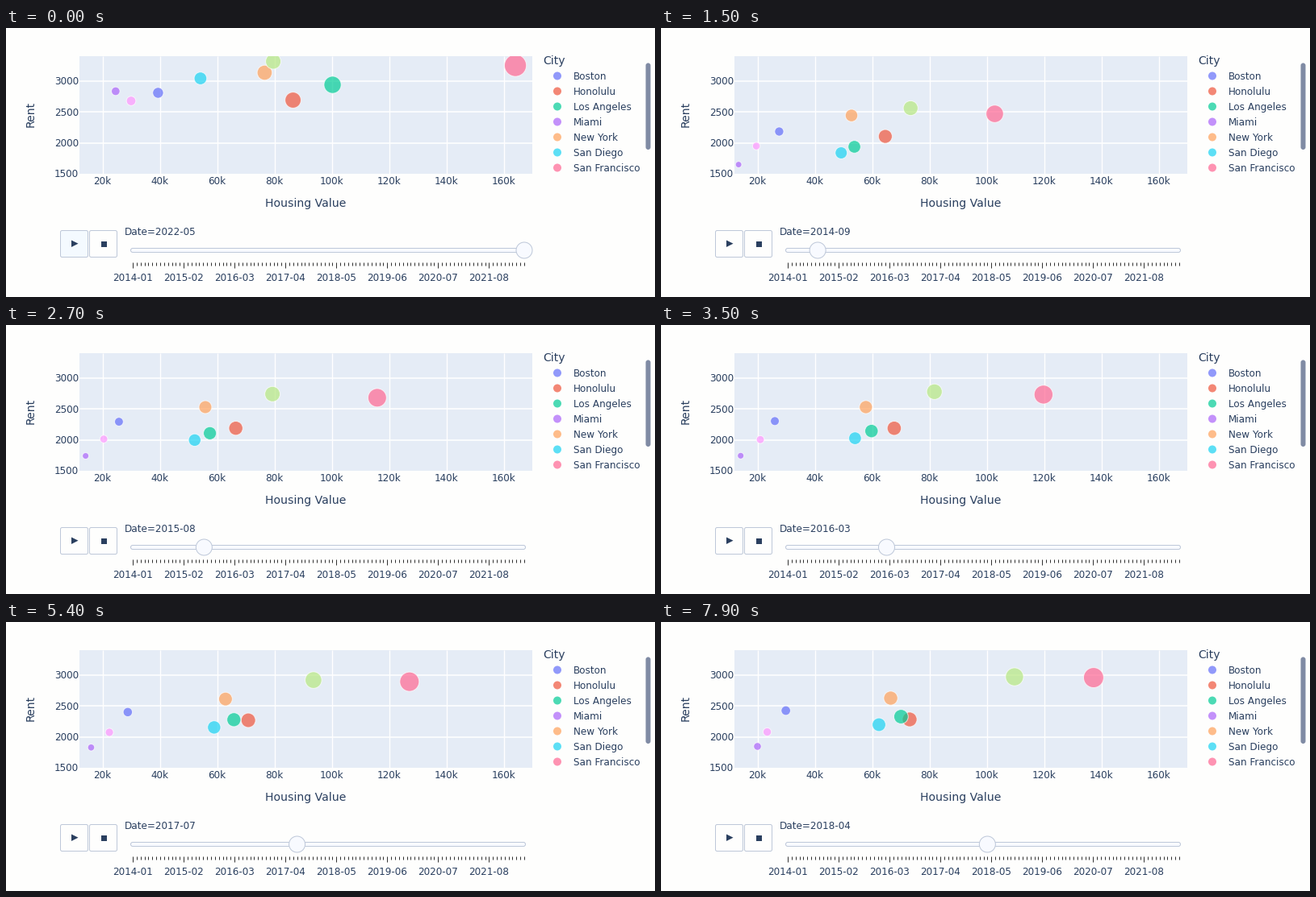
Animation, 804 px wide and 334 px high, one loop 8 s. Source, as a matplotlib script:

```python
import numpy as np
import matplotlib.pyplot as plt
from matplotlib.animation import FuncAnimation
from matplotlib.patches import Circle, FancyBboxPatch, Polygon, Rectangle

W, H, DPI = 804, 334, 64
PT = 72 / DPI
FRAMES, STEP = 80, 100
INK, EDGE, PAGE = "#2a3f5f", "#bec8d9", "#fefefd"
FIRST, RECENT, LAST = 7.6, 51, 100  # months since 2014-01

# label, colour, housing value (k) and rent at FIRST, RECENT and LAST
CITIES = [
    ("Boston", "#636efa", (27.6, 29.9, 39.4), (2172, 2426, 2811)),
    ("Honolulu", "#ef553b", (64.6, 73.1, 86.5), (2093, 2283, 2693)),
    ("Los Angeles", "#00cc96", (53.8, 70.1, 100.3), (1924, 2328, 2941)),
    ("Miami", "#ab63fa", (13.4, 20.0, 24.6), (1637, 1846, 2837)),
    ("New York", "#ffa15a", (52.8, 66.5, 76.6), (2432, 2628, 3137)),
    ("San Diego", "#19d3f3", (49.2, 62.4, 54.2), (1826, 2198, 3045)),
    ("San Francisco", "#ff6692", (102.7, 137.3, 164.1), (2458, 2960, 3254)),
    ("", "#b6e880", (73.4, 109.7, 79.6), (2550, 2973, 3319)),
    ("", "#ff97ff", (19.6, 23.4, 30.0), (1937, 2080, 2680)),
]
# Early surge and late delay of housing value, by city index
BENDS = {0: (-7.5, 0), 3: (0, 3), 6: (1.3, 1), 7: (0, 1.8)}

plt.rcParams["font.family"] = "DejaVu Sans"
fig = plt.figure(figsize=(W / DPI, H / DPI), dpi=DPI, facecolor=PAGE)
ax = fig.add_axes([0, 0, 1, 1])
ax.set_xlim(0, W)
ax.set_ylim(H, 0)
ax.axis("off")


def text(x, y, s, size=12, ha="left"):
    return ax.text(x, y, s, fontsize=size * PT, color=INK, ha=ha, va="baseline")


def rounded(x, y, w, h, r, fill, edge="none"):
    return ax.add_patch(FancyBboxPatch(
        (x, y), w, h, boxstyle=f"round,pad=0,rounding_size={r}",
        fc=fill, ec=edge, lw=PT))


def line(x0, y0, x1, y1, color, lw):
    ax.plot([x0, x1], [y0, y1], color=color, lw=lw * PT, solid_capstyle="butt")


def value_x(v):
    return 119.5 + 3.55 * (v - 20)


def rent_y(r):
    return 181 - (r - 1500) * 0.07667


def month_x(m):
    return 157 + 4.85 * m


def month_name(m):
    return f"{2014 + m // 12}-{m % 12 + 1:02d}"


# Plot area
area = ax.add_patch(Rectangle((91, 35), 561, 146, fc="#e5ecf6", ec="none"))
for v in range(20, 161, 20):
    line(value_x(v), 35, value_x(v), 181, "white", 1.4)
    text(value_x(v), 194, f"{v}k", ha="center")
for r in range(1500, 3001, 500):
    if r > 1500:
        line(91, rent_y(r), 652, rent_y(r), "white", 1.6)
    text(90, rent_y(r) + 4.3, str(r), ha="right")
text(371.5, 222, "Housing Value", 14, "center")
ax.text(38, 106.5, "Rent", fontsize=14 * PT, color=INK, rotation=90,
        ha="right", va="center")

# Legend
text(665.5, 45, "City", 14)
for i, (name, color, *_) in enumerate(CITIES):
    if name:
        y = 59.5 + 19 * i
        ax.add_patch(Circle((683, y), 5, fc=color, ec="none", alpha=0.7))
        text(703, y + 4.5, name)
rounded(792.5, 43.5, 6, 107.5, 3, "#808ba4")

# Buttons
play = rounded(67.5, 251.5, 34, 33, 2, PAGE, EDGE)
rounded(103.5, 251.5, 34, 33, 2, PAGE, EDGE)
ax.add_patch(Polygon([(81, 263.5), (89.5, 267.7), (81, 272)], fc=INK, ec="none"))
ax.add_patch(Rectangle((117.5, 264.5), 7, 7, fc=INK, ec="none"))

# Slider
rounded(154.5, 273.5, 489, 5, 2.5, "#f8faff", EDGE)
for m in range(LAST + 1):
    major = m % 13 == 0
    line(month_x(m), 291, month_x(m), 298 if major else 295, "#333333", 1)
    if major:
        text(month_x(m), 314, month_name(m), ha="center")
grip = ax.add_patch(Circle((0, 276), 10, fc="#f8faff", ec=EDGE, lw=PT, zorder=5))
label = text(147, 257, "")

bubbles = []
for _, color, *_ in CITIES:
    b = ax.add_patch(Circle((0, 0), 5, fc=color, ec="white", lw=PT, alpha=0.7, zorder=4))
    b.set_clip_path(area)
    bubbles.append(b)


def ease(p):
    p = np.clip(p, 0, 1)
    return p * p * (3 - 2 * p)


def playhead(t):
    """Month now reached (fractional) and month named in the label."""
    if t < 0.63:
        return 0, 0
    slow = max(t - 5.4, 0)
    u = 8.8 * (min(t, 5.4) - 0.63) + slow * (5 - 0.58 * slow)
    rate = 5 - 1.16 * slow if slow else 8.8
    m = int(u)
    return m + min((u - m) * 8.8 / rate, 1), m + 1


def grow(p, early, late):
    q = np.clip(p, 0, 1)
    return p + early * q * (1 - q) ** 2 - late * q * q * (1 - q)


def market(i, m):
    """Housing value and rent of one city during playback."""
    (v0, v1, _), (r0, r1, _) = CITIES[i][2:]
    p = (m - FIRST) / (RECENT - FIRST)
    value = v0 + (v1 - v0) * grow(p, *BENDS.get(i, (0, 0.4)))
    rent = r0 + (r1 - r0) * grow(p, 1.2, 0)
    return np.array([value, rent - 18 * np.cos(np.pi * m / 6)])


def update(n):
    t = n * STEP / 1000
    m, named = playhead(t)
    back = ease((t - 0.05) / 0.25)  # rewind from the last date
    for i, b in enumerate(bubbles):
        end = np.array([CITIES[i][2][2], CITIES[i][3][2]])
        value, rent = end + (market(i, m) - end) * back
        b.center = value_x(value), rent_y(rent)
        b.radius = 13.6 * np.sqrt(value / 164)
    grip.center = month_x(LAST + (m - LAST) * back), 276
    label.set_text("Date=" + month_name(named if back else LAST))
    play.set_facecolor(PAGE if back else "#f4faff")
    return [*bubbles, grip, label, play]


anim = FuncAnimation(fig, update, frames=FRAMES, interval=STEP, repeat=True,
                     repeat_delay=0, blit=False)
plt.show()
```
